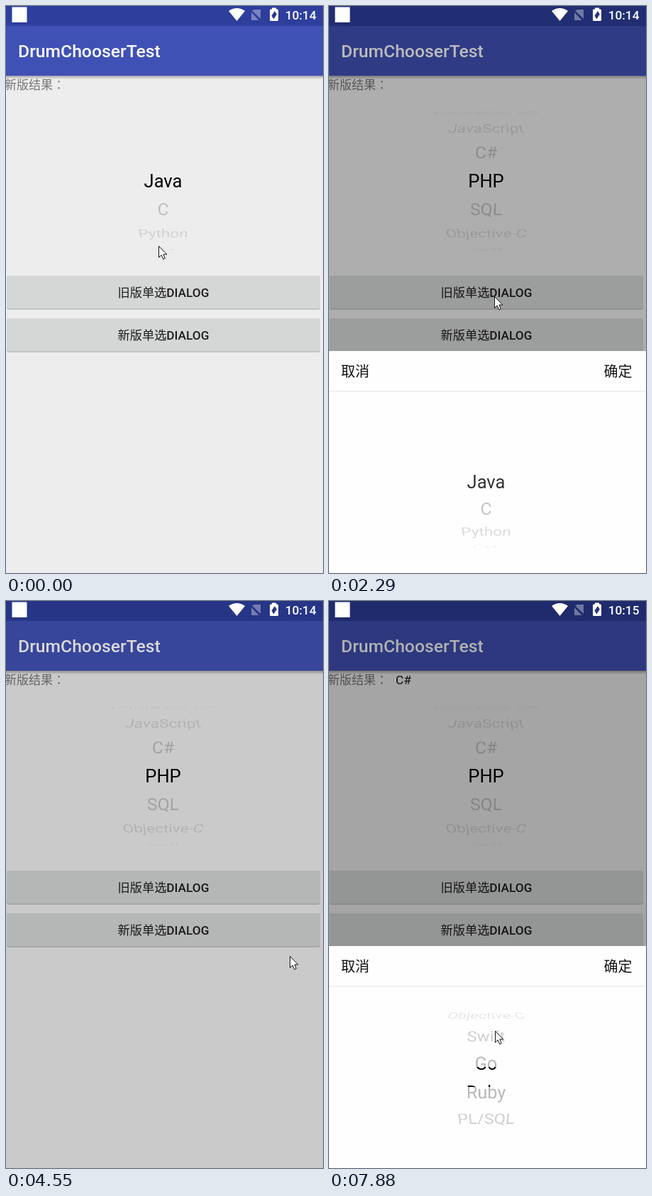
These frames come from a looping animation (447 px wide and 797 px high, 8000 ms). An HTML page with a canvas:

```html
<!DOCTYPE html>
<html lang="zh">
<head>
<meta charset="utf-8">
<title>Wheel picker</title>
<style>
html, body { margin: 0; width: 100%; height: 100%; overflow: hidden; background: #ededed; }
canvas { display: block; }
</style>
</head>
<body>
<canvas id="stage" width="447" height="797"></canvas>
<script>
const W = 447, H = 797, LOOP = 8000, MID = 221.5;
const g = document.getElementById('stage').getContext('2d');
const SANS = 'Roboto, "Noto Sans CJK SC", sans-serif';
const CJK = '"Noto Sans CJK SC", "Noto Sans CJK JP", sans-serif';
const ITEMS = ['Java', 'C', 'Python', 'C++', 'Visual Basic .Net', 'JavaScript', 'C#',
  'PHP', 'SQL', 'Objective-C', 'Swift', 'Go', 'Ruby', 'PL/SQL'];

// Progress from 0 to 1 between two times
const ramp = (t, a, b) => Math.min(1, Math.max(0, (t - a) / (b - a)));
const ease = (t, a, b) => { const u = ramp(t, a, b); return u * u * (3 - 2 * u); };
const easeOut = (t, a, b) => 1 - (1 - ramp(t, a, b)) ** 2;

// Wheel positions, in items
const mainPos = t => 2.31 * ramp(t, 200, 1140) + 4.69 * easeOut(t, 1240, 1990);

const DIALOGS = [
  { open: 2010, close: 4550, radius: 99, half: 93, dark: '#333',
    pos: t => 10.44 * easeOut(t, 2720, 3550) - 4.44 * ease(t, 3550, 4200) },
  { open: 5680, close: LOOP, radius: 104.5, half: 98, dark: '#000',
    pos: t => 6 * ease(t, 6100, 6900) + 5.47 * ramp(t, 7170, 7880) }
];

// Pointer moves: start, end, x, y
const MOVES = [[250, 1140, 230, 306], [1683, 2138, 233, 408], [2440, 2720, 226, 690],
  [2720, 3420, 224, 625], [3694, 4270, 400, 499], [4550, 4850, 260, 460],
  [5911, 6200, 236, 680], [6200, 7720, 234, 604]];

function text(s, x, y, font, color, align = 'left') {
  g.font = font;
  g.fillStyle = color;
  g.textAlign = align;
  g.fillText(s, x, y);
}

function rect(x, y, w, h, color, r = 0) {
  g.beginPath();
  g.roundRect(x, y, w, h, r);
  g.fillStyle = color;
  g.fill();
}

function poly(points, color) {
  g.beginPath();
  points.forEach(([x, y]) => g.lineTo(x, y));
  g.closePath();
  g.fillStyle = color;
  g.fill();
}

// Wheel
const FONT = 25.5, BASE = 9, LABEL_W = 220, LABEL_H = 40, RES = 2;
const STEP = Math.PI / 8, CAMERA = 238, BAND = 14;
const labels = {};

function label(s, color) {
  const key = s + color;
  if (!labels[key]) {
    const c = document.createElement('canvas');
    c.width = LABEL_W * RES;
    c.height = LABEL_H * RES;
    const p = c.getContext('2d');
    p.scale(RES, RES);
    p.font = FONT + 'px ' + SANS;
    p.textAlign = 'center';
    p.fillStyle = color;
    p.fillText(s, LABEL_W / 2, LABEL_H / 2 + BASE);
    labels[key] = c;
  }
  return labels[key];
}

// Text on a cylinder, projected row by row
function wheel(cy, radius, half, pos, dark) {
  ITEMS.forEach((s, i) => {
    const off = i - pos, angle = off * STEP;
    if (Math.abs(off) >= 3.4) return;
    if (Math.abs(off) < 0.01) {
      text(s, MID, cy + BASE, FONT + 'px ' + SANS, dark, 'center');
      return;
    }
    const cos = Math.cos(angle), sin = Math.sin(angle);
    const mid = cy + radius * sin;
    const depth = CAMERA / (CAMERA + radius * (1 - cos));
    const unproject = y => {
      const q = (y - mid) / depth;
      return q * CAMERA / (cos * CAMERA - q * sin);
    };
    const faded = label(s, '#adadad'), lit = label(s, dark);
    const top = Math.max(Math.floor(mid - 20 * cos), Math.ceil(cy - half));
    const bottom = Math.min(Math.ceil(mid + 20 * cos), Math.floor(cy + half));
    for (let y = top; y < bottom; y++) {
      const v0 = unproject(y), v1 = unproject(y + 1);
      if (v0 < -LABEL_H / 2 || v1 > LABEL_H / 2) continue;
      const inBand = Math.abs(y + 0.5 - cy) < BAND;
      const w = LABEL_W * depth * CAMERA / (CAMERA + (v0 + v1) / 2 * sin);
      g.globalAlpha = inBand ? 1 : 1 - Math.abs(off) / 3.5;
      g.drawImage(inBand ? lit : faded, 0, (v0 + LABEL_H / 2) * RES, LABEL_W * RES, (v1 - v0) * RES,
        MID - w / 2, y, w, 1);
    }
    g.globalAlpha = 1;
  });
}

function button(y, s, t, start, px, py) {
  const pressed = t >= start && t < start + 160;
  g.save();
  if (pressed) {
    g.shadowColor = 'rgba(0,0,0,.32)';
    g.shadowBlur = 8;
    g.shadowOffsetY = 4;
  }
  rect(1, y, 442, 48, '#c3c5c4', 3);
  g.restore();
  rect(1, y, 442, 46, pressed ? '#d0d2d1' : '#d5d7d6', 3);
  if (pressed) {
    g.save();
    g.clip();
    const r = 21 + (t - start) * 0.4;
    rect(px - r, py - r, 2 * r, 2 * r, 'rgba(0,0,0,.075)', r);
    g.restore();
  }
  text(s, 222, y + 30, '500 17.2px ' + SANS, '#1c1c1c', 'center');
}

function statusIcons(time) {
  rect(8.5, 1.5, 21, 21.5, '#fff');

  g.beginPath();
  g.moveTo(325.5, 21);
  g.lineTo(314, 7);
  g.quadraticCurveTo(325.5, -1, 337, 7);
  g.fillStyle = '#fff';
  g.fill();

  const faint = 'rgba(255,255,255,.36)';
  poly([[350, 5], [359, 5], [359, 18], [347, 6.5]], faint);
  poly([[346, 9], [356.5, 20], [346, 20]], faint);

  rect(375, 2.5, 6, 3, '#fff');
  rect(372, 4.5, 12, 16.5, '#fff', 1.5);
  poly([[379, 7], [374.5, 13.5], [377.3, 18.5], [381.8, 11.8]], '#283584');

  text(time, 437.5, 19.3, '500 17.3px ' + SANS, '#fff', 'right');
}

function pointer(t) {
  let x = 215, y = 337;
  for (const [a, b, toX, toY] of MOVES) {
    const u = ease(t, a, b);
    x += (toX - x) * u;
    y += (toY - y) * u;
  }
  g.save();
  g.translate(Math.round(x) + 0.5, Math.round(y) + 0.5);
  poly([[0, 0], [0, 16], [3.6, 12.6], [6.2, 18.4], [8.8, 17.3], [6.3, 11.6], [11.3, 11.6]], '#fff');
  g.strokeStyle = '#111';
  g.lineWidth = 1;
  g.stroke();
  g.restore();
}

function dimming(t, d) {
  return t < d.close ? 0.305 * ramp(t, d.open, d.open + 320) : 0.15 * (1 - ramp(t, d.close, d.close + 220));
}

function dialog(t, d) {
  if (t < d.open + 120 || t >= d.close) return;
  const top = Math.round(H - (H - 485) * easeOut(t, d.open, d.open + 270));
  rect(0, top, W, H - top, '#fefefe');
  rect(0, top + 56, W, 1, '#e8e8e8');
  text('取消', 17, top + 36, '20px ' + CJK, '#111');
  text('确定', 427.5, top + 36, '20px ' + CJK, '#111', 'right');
  wheel(top + 184, d.radius, d.half, d.pos(t), d.dark);
}

function draw(t) {
  rect(0, 0, W, H, '#ededed');
  text('新版结果', -2, 116.5, '17px ' + CJK, '#757575');
  text('：', 66, 116.5, '17px "Noto Sans CJK JP", sans-serif', '#757575');
  if (t >= 6900) text('C#', 94, 116.5, '17.3px ' + SANS, '#111');

  wheel(246, 104.5, 98, mainPos(t), '#000');
  button(379, '旧版单选DIALOG', t, 1990, 234, 408);
  button(439, '新版单选DIALOG', t, 5620, 256, 460);

  const shade = g.createLinearGradient(0, 98, 0, 103);
  shade.addColorStop(0, 'rgba(0,0,0,.3)');
  shade.addColorStop(1, 'rgba(0,0,0,0)');
  rect(0, 98, W, 5, shade);
  rect(0, 0, W, 28, '#2d3e9d');
  rect(0, 28, W, 70, '#4051b5');
  text('DrumChooserTest', 17, 72, '500 24.7px ' + SANS, '#fff');

  for (const d of DIALOGS) rect(0, 0, W, H, `rgba(0,0,0,${dimming(t, d)})`);
  statusIcons(t >= 7170 ? '10:15' : '10:14');
  for (const d of DIALOGS) dialog(t, d);
  pointer(t);
}

function frame() {
  draw(performance.now() % LOOP);
  requestAnimationFrame(frame);
}
frame();
</script>
</body>
</html>
```
